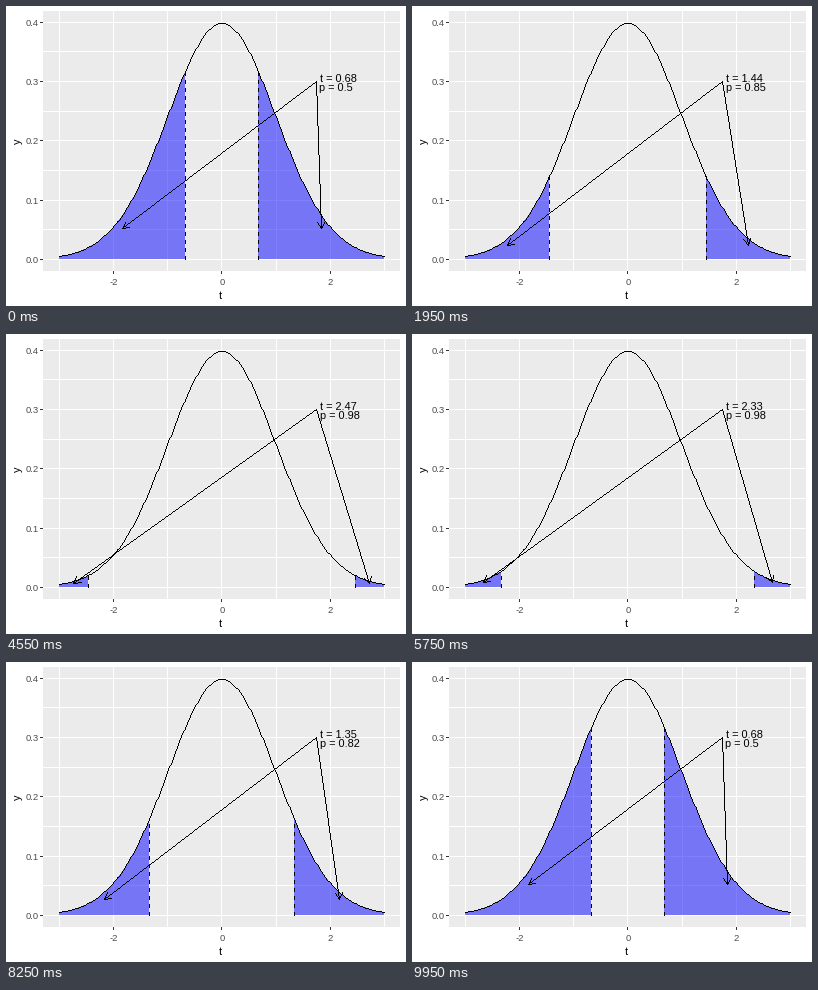
A matplotlib script that plays this animation: 400x300 px, repeating every 10000 ms.

```python
import math

import numpy as np
import matplotlib
import matplotlib.pyplot as plt
from matplotlib.animation import FuncAnimation
from matplotlib.patches import PathPatch, Polygon, Rectangle
from matplotlib.path import Path

matplotlib.rcParams["font.family"] = "Liberation Sans"

W, H, DPI = 400, 300, 100
PX = 72 / DPI            # one pixel in points
STEPS = 100              # steps of the sweep in one direction
DF = 100                 # degrees of freedom
T_LOW, T_HIGH = 0.676951, 2.625891   # 75% and 99.5% quantiles
LEFT, RIGHT, TOP, BOTTOM = 37.3, 394.5, 5.5, 265.4
LABEL = (1.75, 0.3)
HEAD = 7.2

NORM = math.gamma((DF + 1) / 2) / (math.sqrt(DF * math.pi) * math.gamma(DF / 2))

# the axes leave 5% of the data range free on every side
X_MID, X_UNIT = (LEFT + RIGHT) / 2, (RIGHT - LEFT) / 6.6
Y_UNIT = (BOTTOM - TOP) / (1.1 * NORM)
Y_ZERO = BOTTOM - 0.05 * NORM * Y_UNIT


def density(t):
    return NORM * (1 + np.square(t) / DF) ** (-(DF + 1) / 2)


def coverage(t):
    """Probability between -t and t."""
    x = np.linspace(0, t, 2001)
    y = density(x)
    return 2 * (y.sum() - (y[0] + y[-1]) / 2) * (x[1] - x[0])


def sx(t):
    return X_MID + X_UNIT * np.asarray(t)


def sy(y):
    return Y_ZERO - Y_UNIT * np.asarray(y)


fig = plt.figure(figsize=(W / DPI, H / DPI), dpi=DPI, facecolor="white")
ax = fig.add_axes([0, 0, 1, 1])
ax.set_xlim(0, W)
ax.set_ylim(H, 0)
ax.axis("off")


def trace(points):
    """Pixels of a hard-edged, one pixel wide line through the points."""
    pts = np.floor(np.asarray(points, float))
    parts = [pts[:1]]
    for a, b in zip(pts[:-1], pts[1:]):
        n = int(np.abs(b - a).max())
        if n:
            s = np.arange(1, n + 1)[:, None] / n
            parts.append(np.floor(a + (b - a) * s + 0.5))
    return np.vstack(parts)


def squares(pixels):
    corners = np.array([[0, 0], [1, 0], [1, 1], [0, 1]])
    return Path.make_compound_path_from_polys(pixels[:, None, :] + corners)


def ink(pixels, z):
    return ax.add_patch(PathPatch(squares(pixels), fc="black", lw=0, zorder=z))


def box(x0, y0, x1, y1, color):
    x0, y0, x1, y1 = map(math.floor, (x0, y0, x1, y1))
    ax.add_patch(Rectangle((x0, y0), x1 - x0, y1 - y0, fc=color, lw=0, zorder=1))


def text(x, y, s, size, color="black", **kw):
    return ax.text(x, y, s, fontsize=size * PX, color=color, zorder=6, **kw)


def draw_panel():
    box(LEFT, TOP, RIGHT, BOTTOM, "#ebebeb")
    for t in range(-3, 4):
        box(sx(t), TOP, sx(t) + 1, BOTTOM, "white")
    for k in range(9):
        y = sy(k * 0.05)
        box(LEFT, y, RIGHT, y + 1, "white")
    for t in (-2, 0, 2):
        box(sx(t), BOTTOM, sx(t) + 1, BOTTOM + 3, "#333333")
        text(sx(t), 279, str(t), 9.5, "#4d4d4d", ha="center")
    for k in range(5):
        y = sy(k * 0.1)
        box(LEFT - 3, y, LEFT, y + 1, "#333333")
        text(33, y + 3.5, f"{k / 10:.1f}", 9.5, "#4d4d4d", ha="right")
    text(214.5, 293, "t", 11, ha="center")
    text(12, 135.5, "y", 11, ha="center", va="center", rotation=90)
    t = np.linspace(-3, 3, 301)
    ink(trace(np.column_stack([sx(t), sy(density(t))])), 4)


def tail_shape(t0, t1):
    """Stepped area under the curve, one step for each pixel column."""
    cols = np.arange(math.floor(sx(t0)), math.floor(sx(t1)))
    rows = np.floor(sy(density((cols + 0.5 - X_MID) / X_UNIT)))
    xs = np.column_stack([cols, cols + 1]).ravel()
    base = math.floor(Y_ZERO)
    return np.vstack([np.column_stack([xs, np.repeat(rows, 2)]),
                      [(xs[-1], base), (xs[0], base)]])


def dashes(t):
    pixels = trace([(sx(t), sy(0)), (sx(t), sy(density(t)))])
    return pixels[np.arange(len(pixels)) % 8 < 4]


def arrow_pixels(x0, y0, x1, y1):
    back = math.atan2(y0 - y1, x0 - x1)
    barbs = [(x1 + HEAD * math.cos(back + a), y1 + HEAD * math.sin(back + a))
             for a in (-math.pi / 6, math.pi / 6)]
    return np.vstack([trace([(x0, y0), (x1, y1)]),
                      trace([barbs[0], (x1, y1), barbs[1]])])


draw_panel()
tails, cuts, arrows = [], [], []
for _ in range(2):
    tail = Polygon(np.zeros((3, 2)), fc=(0, 0, 1, 0.5), lw=0, zorder=3)
    tails.append(ax.add_patch(tail))
    cuts.append(ink(np.zeros((1, 2)), 4))
    arrows.append(ink(np.zeros((1, 2)), 5))
t_text = text(0, 76, "", 11)
p_text = text(0, 85, "", 11)


def set_label(label, name, value):
    s = f"{name} = {round(value, 2):g}"
    label.set_text(s)
    label.set_x(310.1 + 0.47 * len(s))


def update(frame):
    step = min(frame, 2 * STEPS - 1 - frame)
    t = T_LOW + (T_HIGH - T_LOW) * step / (STEPS - 1)
    mid = (t + 3) / 2
    tip_y = sy(0.7 * density(mid))
    for side, tail, cut, arrow in zip((-1, 1), tails, cuts, arrows):
        tail.set_xy(tail_shape(*sorted((side * t, side * 3))))
        cut.set_path(squares(dashes(side * t)))
        arrow.set_path(squares(arrow_pixels(
            sx(LABEL[0]), sy(LABEL[1]), sx(side * mid), tip_y)))
    set_label(t_text, "t", t)
    set_label(p_text, "p", coverage(t))
    return [*tails, *cuts, *arrows, t_text, p_text]


anim = FuncAnimation(fig, update, frames=2 * STEPS, interval=50,
                     repeat=True, repeat_delay=0, blit=False)
plt.show()
```
